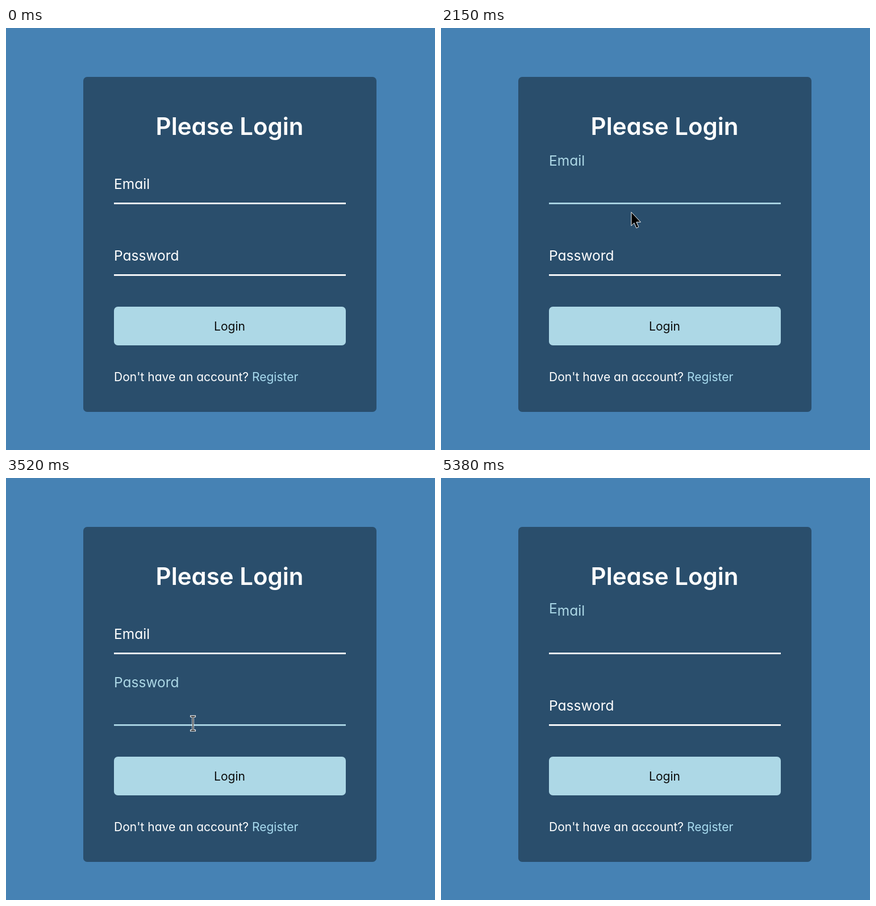
Recreate the animation shown at these times as an HTML page. Size 755 px wide and 742 px high, loop 5.41 s.

```html
<!DOCTYPE html>
<html lang="en">
<head>
<meta charset="utf-8">
<title>Login form</title>
<style>
html, body { margin: 0; width: 100%; height: 100%; overflow: hidden; background: steelblue; }
svg { display: block; }
text { font: 21px Inter, "Noto Sans", sans-serif; font-feature-settings: "cv11"; fill: #fff; }
.title { font-size: 42px; font-weight: 600; }
.label { font-size: 24.5px; }
.mid { text-anchor: middle; }
</style>
</head>
<body>
<svg width="755" height="742" viewBox="0 0 755 742">
  <rect x="136" y="86" width="516" height="589" rx="6.8" fill="#2a4e6c"/>
  <text class="title mid" x="393.5" y="187.5">Please Login</text>
  <g id="fields"></g>
  <rect x="190" y="490" width="408" height="68" rx="6.8" fill="lightblue"/>
  <text class="mid" x="393.5" y="532" style="fill:#0a0a0a">Login</text>
  <text x="190" y="620.5">Don't have an account? <tspan fill="#a9dcf0">Register</tspan></text>
  <path id="arrow" d="M0 0V24L5 19L9 28L13 26L9 17.5H16.5Z" fill="#000" stroke="#fff"/>
  <g id="beam" fill="none">
    <path d="M-5-12.5H5M0-14V14M-5 12.5H5" stroke="#fff" stroke-width="3.4"/>
    <path d="M-4-12.5H4M0-12.5V12.5M-4 12.5H4" stroke="#000" stroke-width="1.3"/>
  </g>
  <circle id="press" r="16.5" fill="#ec8c44" fill-opacity=".5"/>
</svg>
<script>
const LOOP = 5410, LIFT = 41, PRESS_TIME = 110;
const $ = id => document.getElementById(id);

function add(parent, tag, attrs, content = '') {
  const el = document.createElementNS('http://www.w3.org/2000/svg', tag);
  for (const name in attrs) el.setAttribute(name, attrs[name]);
  el.textContent = content;
  return parent.appendChild(el);
}

// focus: [time, gains focus]
const fields = [
  { word: 'Email', y: 283, focus: [[1185, 1], [2570, 0], [4060, 1], [5320, 0]] },
  { word: 'Password', y: 409, focus: [[2570, 1], [4060, 0]] }
];
for (const f of fields) {
  f.line = add($('fields'), 'rect', { x: 190, y: f.y + 24, width: 408, height: 2.8 });
  const label = add($('fields'), 'text', { class: 'label', x: 190, y: f.y });
  f.letters = [...f.word].map(c => add(label, 'tspan', {}, c));
  f.caret = add($('fields'), 'rect', { x: 190, y: f.y - 24, width: 1, height: 27, fill: '#fff' });
}

// cubic-bezier(.68, -.55, .265, 1.55)
function backEase(p) {
  if (p <= 0) return 0;
  if (p >= 1) return 1;
  const curve = (s, a, b) => 3 * s * (1 - s) ** 2 * a + 3 * s * s * (1 - s) * b + s ** 3;
  let lo = 0, hi = 1;
  for (let i = 0; i < 24; i++) {
    const mid = (lo + hi) / 2;
    if (curve(mid, .68, .265) < p) lo = mid; else hi = mid;
  }
  return curve(lo, -.55, 1.55);
}

const easeOut = p => 1 - (1 - p) ** 2;
const easeIn = p => p * p;
const smooth = p => p * p * (3 - 2 * p);
const linear = p => p;

// pointer stops: time, x, y, easing towards the stop
const path = [
  [245, 745, 755],
  [880, 382, 313, easeOut],
  [1180, 338, 281, smooth],
  [1940, 338, 281, linear],
  [2540, 327, 431.5, smooth],
  [2720, 327, 431.5, linear],
  [2800, 329, 433, smooth],
  [3490, 329, 433, linear],
  [4020, 332, 288, smooth],
  [4280, 332, 288, linear],
  [4490, 343, 324, easeIn],
  [4600, 482, 503, easeIn],
  [4740, 765, 790, linear]
];

function pointerAt(t) {
  const i = path.findIndex(stop => stop[0] > t);
  if (i < 1) return [800, 800];
  const [t0, x0, y0] = path[i - 1], [t1, x1, y1, ease] = path[i];
  const k = ease((t - t0) / (t1 - t0));
  return [x0 + (x1 - x0) * k, y0 + (y1 - y0) * k];
}

function tint(k) {
  const mix = c => Math.min(255, 255 + (c - 255) * k);
  return `rgb(${mix(173)},${mix(216)},${mix(230)})`;
}

const show = (el, on) => el.setAttribute('visibility', on ? 'visible' : 'hidden');

function drawField(f, t) {
  const [start, on] = f.focus.filter(e => e[0] <= t).pop() || [-LOOP, 0];
  f.line.setAttribute('fill', on ? 'lightblue' : '#fff');
  show(f.caret, on && (t - start) % 1000 < 500);
  let last = 0;
  f.letters.forEach((letter, i) => {
    const k = backEase((t - start - 10 - 50 * i) / 300);
    const up = on ? k : 1 - k;
    letter.setAttribute('dy', -LIFT * up - last);
    letter.setAttribute('fill', tint(up));
    last = -LIFT * up;
  });
}

function drawPointer(t) {
  const [x, y] = pointerAt(t);
  const inField = x > 190 && x < 598 && fields.some(f => y > f.y - 38 && y < f.y + 27);
  for (const id of ['arrow', 'beam', 'press'])
    $(id).setAttribute('transform', `translate(${x} ${y})`);
  show($('arrow'), !inField);
  show($('beam'), inField);
  show($('press'), [1185, 2570, 4060].some(p => t >= p && t < p + PRESS_TIME));
}

const begin = performance.now();
function draw() {
  const t = (performance.now() - begin) % LOOP;
  fields.forEach(f => drawField(f, t));
  drawPointer(t);
  requestAnimationFrame(draw);
}
draw();
</script>
</body>
</html>
```
